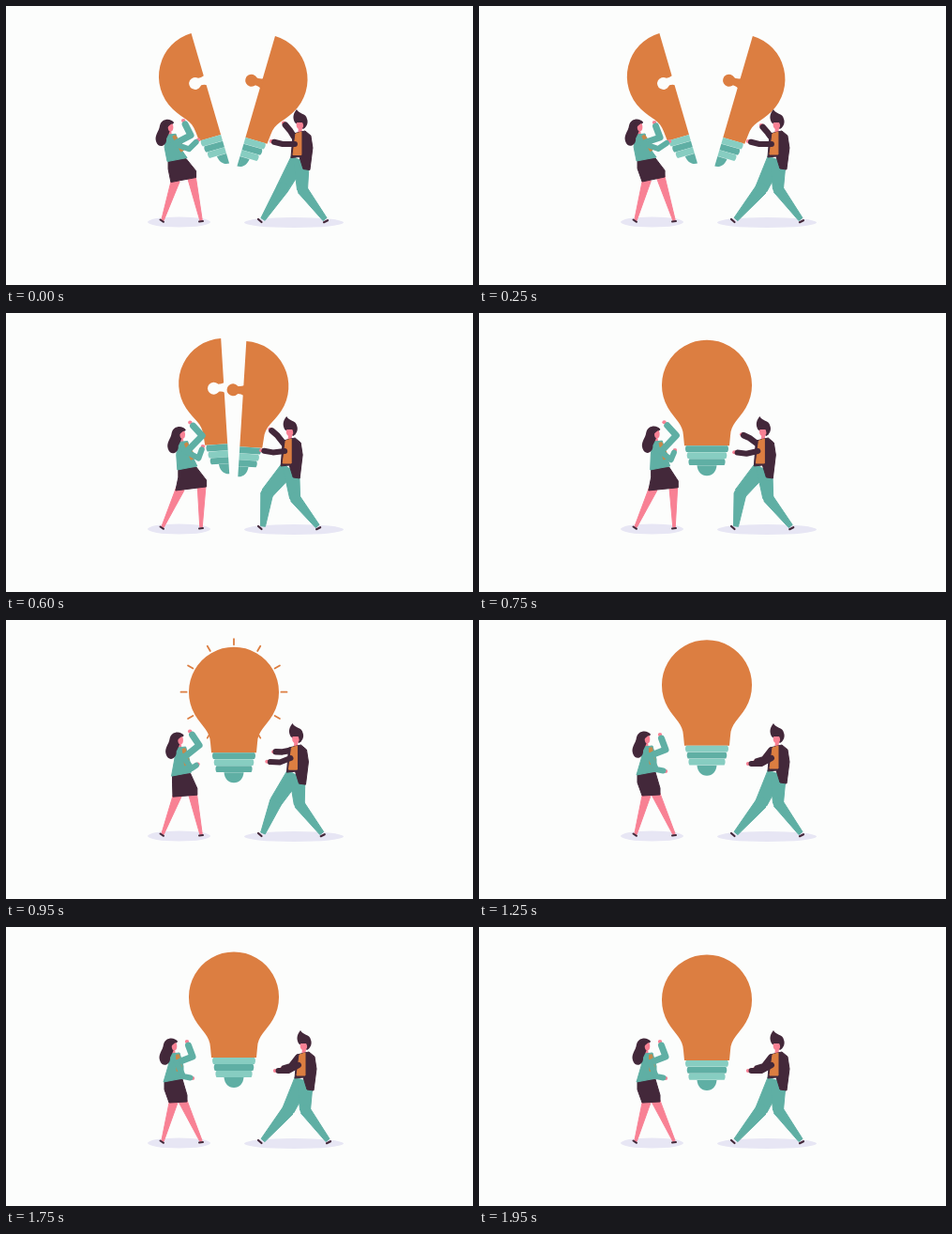
An HTML page that plays this animation: 498x297 px, repeating every 2000 ms.

```html
<!DOCTYPE html>
<html lang="en">
<head>
<meta charset="utf-8">
<title>Two people join a light bulb</title>
<style>
  html, body { margin: 0; width: 100%; height: 100%; overflow: hidden; background: #fcfdfc; }
  svg { display: block; width: 100vw; height: 100vh; }
</style>
</head>
<body>
<svg id="stage" viewBox="0 0 498 297"></svg>
<script>
const LOOP = 2000, STEP = 50, JOIN = 750;
const BG = '#fcfdfc', ORANGE = '#dc7e41', TEAL = '#5fafa4', MINT = '#87cdc1',
      DARK = '#43283a', PINK = '#f88194', BLOUSE = '#c8894a', SHADE = '#e7e6f4';

// Smooth 0 to 1 between two times.
function ramp(t, from, to) {
  const p = Math.min(1, Math.max(0, (t - from) / (to - from)));
  return p * p * (3 - 2 * p);
}

// Everything moves by four signals.
const spread = t => 1 + .16 * ramp(t, 0, 250) - 1.16 * ramp(t, 330, JOIN);        // gap between halves
const stride = t => .27 * (1 - ramp(t, 0, 270)) + ramp(t, 300, 620) - ramp(t, 700, 1250); // step towards the bulb
const effort = t => 1 - ramp(t, 300, 1250);                                       // arms carrying the weight
const bob = t => 72.5 - 5 * Math.cos(Math.PI * (t - 1400) / 550);                 // height of the whole bulb

const off = (p, x, y) => [p[0] + x, p[1] + y];
const shape = (d, fill) => `<path d="${d}" fill="${fill}"/>`;
const poly = (pts, fill) => `<polygon points="${pts.join(' ')}" fill="${fill}" stroke="${fill}" stroke-linejoin="round"/>`;
const line = (pts, color, w) =>
  `<polyline points="${pts.join(' ')}" fill="none" stroke="${color}" stroke-width="${w}" stroke-linecap="round" stroke-linejoin="round"/>`;
const oval = (p, rx, ry, fill) => `<ellipse cx="${p[0]}" cy="${p[1]}" rx="${rx}" ry="${ry}" fill="${fill}"/>`;
const move = (p, content, angle = 0) => `<g transform="translate(${p}) rotate(${angle})">${content}</g>`;

// Tapered limb from a to b.
function limb(a, b, wa, wb, fill) {
  const dx = b[0] - a[0], dy = b[1] - a[1], len = Math.hypot(dx, dy) || 1;
  const nx = -dy / len / 2, ny = dx / len / 2;
  return poly([off(a, nx * wa, ny * wa), off(b, nx * wb, ny * wb),
               off(b, -nx * wb, -ny * wb), off(a, -nx * wa, -ny * wa)], fill);
}

function arm(shoulder, elbow, hand, color, w) {
  const cuff = off(hand, (elbow[0] - hand[0]) * .25, (elbow[1] - hand[1]) * .25);
  return oval(hand, 2.2, 2, PINK) + line([shoulder, elbow, cuff], color, w);
}

// Half of a bulb around the centre of its globe; side is -1 or 1.
function half(side, swapped) {
  let bands = '';
  for (let i = 0; i < 3; i++) {
    const color = (i % 2 === 0) === swapped ? TEAL : MINT;
    bands += shape(`M0 ${64.5 + 7 * i}H${22 - 1.7 * i}q2 3 0 6.8H0Z`, color);
  }
  return `<g transform="scale(${side} 1)">` +
    shape('M0-48A48 48 0 0 1 41.6 24C34 37 25.5 41 25 54L24 64.5H0Z', ORANGE) + bands +
    shape('M0 85.5H10.5C10 92 6 96.5 0 96.5Z', TEAL) + '</g>';
}

const tab = fill => oval([-11, 4.5], 6.5, 6.5, fill) + shape('M1-1Q-4 1-8 0V9Q-4 7 1 10Z', fill);

function rays(t) {
  if (t <= 800 || t >= 1050) return '';
  const p = (t - 800) / 250, outer = 49 + 7.5 * Math.min(1, p * 1.7), inner = 48 + 4 * p;
  let out = '';
  for (let k = -5; k <= 5; k++) {
    const a = k * Math.PI / 6, s = Math.sin(a), c = -Math.cos(a);
    out += line([[s * inner, c * inner], [s * outer, c * outer]], ORANGE, 1.8);
  }
  return out;
}

function drawBulb(t) {
  const swapped = t >= 550 && t < 1050;
  if (t >= JOIN) return move([243, bob(t)], rays(t) + half(-1, swapped) + half(1, swapped));
  const s = spread(t), angle = 16.3 * Math.min(1, s ** 1.4);
  return move([243 - 32 * s, 75], half(-1, swapped) + tab(BG), -angle) +
         move([243 + 30.5 * s, 75 + 3 * Math.min(1, 3 * s)], half(1, swapped) + tab(ORANGE), angle);
}

function drawWoman(t) {
  const step = stride(t), hold = effort(t);
  const hip = [178 + 15 * step, 164 + 2 * step];
  const head = [hip[0] + 1 - 8 * hold, 126 + 2 * hold + step];
  const hemL = off(hip, -4 - 8 * step, 23), hemR = off(hip, 15 + 5 * hold + 2 * step, 22 - 4 * hold);
  return limb(off(hemL, 5, -2), [167, 228], 9, 2.5, PINK) + limb(off(hemR, -5, -2), [208, 228], 9, 2.5, PINK) +
    line([[164.5, 227.5], [168, 229.8]], DARK, 2) + line([[206, 229.5], [210, 229]], DARK, 2) +
    poly([off(hip, -9, -1), off(hip, 10, -2), off(hemR, 0, -7), hemR, hemL, off(hip, -9, 9)], DARK) +
    line([off(head, -1, 4), off(head, 0, 11)], PINK, 4) +
    poly([off(head, -4, 9), off(head, 6, 8), off(head, 10, 22), off(hip, 11, -3), off(hip, -10, 1), off(head, -6, 22)], TEAL) +
    limb(off(head, 4, 10), off(hip, 7, -11), 3, 6, BLOUSE) +
    arm(off(head, 7, 17), off(head, 20 + 2 * hold, 12 - 10 * step),
        off(head, 14 + 2 * hold - 7 * step, -4 - 8 * step), TEAL, 7) +
    arm(off(head, 3, 18), off(head, 10 + 10 * hold, 33 - 9 * hold),
        off(head, 20 + 12 * hold - 7 * step, 35 - 19 * hold - 7 * step), TEAL, 6) +
    move(head,
      shape('M4-4C1-9-9-9-11-1C-12 6-17 9-15 16C-12 25-3 20-4 13C-2 9 1 4 0 0Z', DARK) +
      oval([.5, 1], 2.8, 4.2, PINK) + shape('M4-4C1-8-7-7-5 2C-3 2-1-2 4-4Z', DARK));
}

function drawMan(t) {
  const step = stride(t), hold = effort(t);
  const hip = [318 - 15 * step, 167 + 2 * step], head = [hip[0], 126];
  const toe = [343 - 11 * step, 227];
  const leg = (knee, foot, dx, w) => limb(off(hip, dx, -4), knee, 17, w, TEAL) +
    oval(knee, w / 2, w / 2, TEAL) + limb(knee, foot, w, 5, TEAL);
  return line([[269, 227], [272.5, 230]], DARK, 2.2) +
    line([off(toe, -1, 3.2), off(toe, 3, 1.2)], DARK, 2.2) +
    leg(off(hip, -17 - 8 * step, 28 - 5 * step), [274, 227], -2, 13) +
    leg(off(hip, 1 + 4 * step, 28), toe, 1, 11) +
    arm(off(head, -7, 13), off(head, 4 * hold - 3 * step - 14, 22 - 13 * hold - 8 * step),
        off(head, 7 * hold - 3 * step - 24, 25 - 24 * hold - 9 * step), DARK, 6.5) +
    line([off(head, 0, 4), off(head, -1, 11)], PINK, 4) +
    poly([off(head, -8, 10), off(head, 5, 7), off(head, 11, 12), off(head, 13, 25),
          off(hip, 10, 7), off(hip, 3, 6), off(hip, -1, -7), off(hip, -10, -6), off(head, -9, 24)], DARK) +
    poly([off(head, -5, 10), off(head, 1, 8), off(hip, 1, -9), off(hip, -8, -9)], ORANGE) +
    arm(off(head, -6, 21), off(head, -17 - 2 * hold, 27 - 6 * hold), off(head, -31, 27 - 9 * hold), DARK, 6) +
    move(head,
      shape('M-6-2C-9-8-7-12-4-16C-2-11 6-12 7-6C9-1 6 3 3 5Z', DARK) +
      oval([-.5, .5], 3.8, 5, PINK) + shape('M-5-2C-5-7 3-8 6-5L5 4C3 2 3-1 2-2Z', DARK));
}

const stage = document.getElementById('stage');
const start = performance.now();
let shown = -1;

function tick() {
  const t = Math.floor((performance.now() - start) % LOOP / STEP) * STEP;
  if (t !== shown) {
    shown = t;
    stage.innerHTML = oval([184.5, 230], 33.5, 5.5, SHADE) + oval([307, 230.5], 53, 5.5, SHADE) +
      drawBulb(t) + drawWoman(t) + drawMan(t);
  }
  requestAnimationFrame(tick);
}
tick();
</script>
</body>
</html>
```
